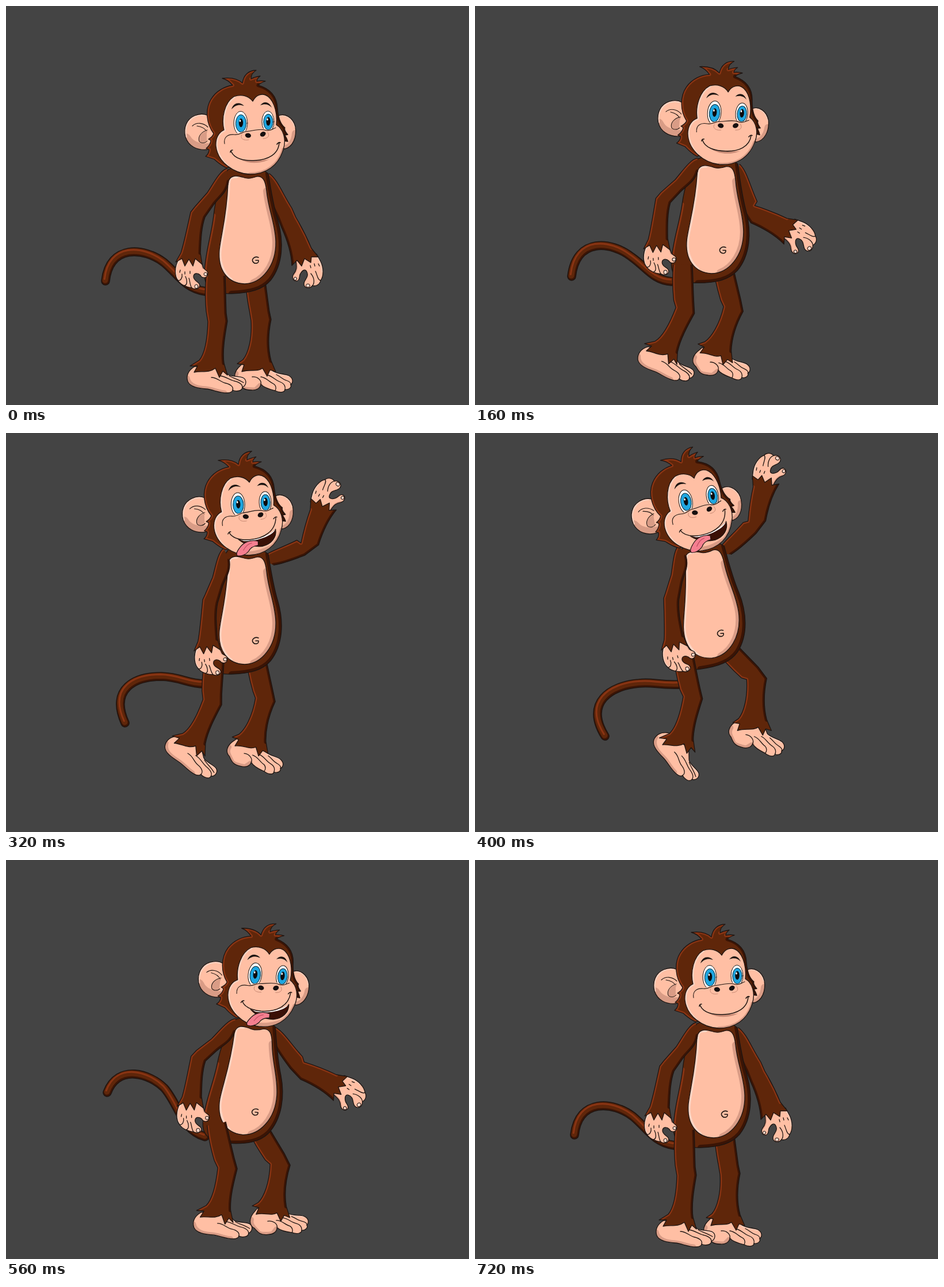
Write an HTML page that moves like this. It is 805x695 px and loops after 0.8 s.

```html
<!DOCTYPE html>
<html lang="en">
<head>
<meta charset="utf-8">
<title>Jumping monkey</title>
<style>
html, body { margin: 0; width: 100%; height: 100%; overflow: hidden; background: #444; }
svg { display: block; }
</style>
</head>
<body>
<svg id="stage" width="805" height="695" viewBox="0 0 805 695" fill="none" stroke-linejoin="round" stroke-linecap="round"></svg>
<script>
const LINE = '#1d1512';
const FUR = { fill: '#5f260a', light: '#8a3413', dark: '#3a1405' };
const SKIN = { fill: '#ffbfa4', light: '#ffd5c4', dark: '#d99c86' };
const stage = document.getElementById('stage');
let clips = 0;

function el(tag, attrs, parent) {
  const node = document.createElementNS('http://www.w3.org/2000/svg', tag);
  for (const k in attrs) node.setAttribute(k, attrs[k]);
  parent.appendChild(node);
  return node;
}
const group = parent => el('g', {}, parent);
const fill = (parent, d, color) => el('path', { d, fill: color }, parent);
const ink = (parent, d, width = 1.3, color = LINE) =>
  el('path', { d, stroke: color, 'stroke-width': width }, parent);
const oval = (parent, cx, cy, rx, ry, color, extra) =>
  el('ellipse', { cx, cy, rx, ry, fill: color, ...extra }, parent);

// Outlined shape with a light and a dark edge kept inside it
function solid(parent, tone, widthLight, widthDark) {
  const id = 'c' + clips++;
  const clip = el('path', {}, el('clipPath', { id }, parent));
  const body = fill(parent, '', tone.fill);
  const inner = el('g', { 'clip-path': `url(#${id})` }, parent);
  const dark = ink(inner, '', widthDark, tone.dark);
  const light = ink(inner, '', widthLight, tone.light);
  const edge = ink(parent, '');
  return (d, lightD, darkD) => {
    for (const p of [clip, body, edge]) p.setAttribute('d', d);
    light.setAttribute('d', lightD);
    dark.setAttribute('d', darkD);
  };
}

// Rotation about a rest point that is carried to a new place
function pin([rx, ry], [x, y], deg) {
  const t = deg * Math.PI / 180, a = Math.cos(t), b = Math.sin(t);
  return [a, b, -b, a, x - a * rx + b * ry, y - b * rx - a * ry];
}
const at = (m, [x, y]) => [m[0] * x + m[2] * y + m[4], m[1] * x + m[3] * y + m[5]];
const warp = (d, m) => d.replace(/(-?[\d.]+) (-?[\d.]+)/g, (_, x, y) =>
  at(m, [+x, +y]).map(v => v.toFixed(2)).join(' '));
const place = (node, m) => node.setAttribute('transform', `matrix(${m})`);

// Two bones wrapped in one outline; s = side strings, A = first side, B = second side
function limb(parent, rest, s, flip) {
  const draw = solid(parent, FUR, 6, 7);
  return (root, upDeg, lowDeg) => {
    const up = pin(rest[0], root, upDeg);
    const low = pin(rest[1], at(up, rest[1]), lowDeg);
    const a = warp(s.upA, up) + warp(s.lowA, low);
    const b = warp(s.lowB, low) + warp(s.upB, up);
    const sides = [a, b.replace('L', 'M')];
    if (flip) sides.reverse();
    draw(a + warp(s.cuff, low) + b, ...sides);
    return low;
  };
}

const tailG = group(stage);
const tail = [[15.6, LINE, 0], [13, FUR.dark, 0], [10, FUR.fill, -1.2], [3, FUR.light, -3.4]].map(([w, c, dy]) => {
  const p = ink(tailG, '', w, c);
  p.setAttribute('transform', `translate(${dy / 2} ${dy})`);
  return p;
});

const farFoot = group(stage);
solid(farFoot, SKIN, 4, 9)(
  'M404 630C396 639 395 650 404 656C410 665 414 669 426 669C435 670 442 666 443 659C450 666 460 668 468 670C478 675 485 672 485 668C492 669 497 664 495 660C500 655 499 648 492 644C484 640 474 642 464 636L455 622L412 622Z',
  'M464 636C474 642 484 640 492 644',
  'M400 640C396 650 404 656 410 665C414 669 424 669 434 669L442 661');
ink(farFoot, 'M443 659C445 652 437 645 428 646M443 646C453 647 457 655 465 658C470 661 470 667 468 670M455 643C464 645 468 652 477 655C485 658 486 664 485 668M470 642C478 646 480 650 487 652C493 654 496 657 495 660');

const FAR_HIP = [431, 456], NEAR_HIP = [363, 455], FAR_SHOULDER = [455, 305], NEAR_SHOULDER = [378, 300];
const FAR_ANKLE = [435, 630], NEAR_ANKLE = [352, 634];

const farLeg = limb(stage, [FAR_HIP, [443, 547]], {
  upA: 'M415 455C416 495 420 515 423 530',
  lowA: 'L426 548C428 580 421 605 412 616L402 623',
  cuff: 'L414 625L410 637C425 632 436 638 446 631L454 645L459 634L469 637',
  lowB: 'L461 618C455 595 456 570 461 546',
  upB: 'L458 532C455 510 451 480 448 455'
});

const farHand = group(stage);
solid(farHand, SKIN, 4, 4)(
  'M504 444C506 456 505 461 500 467C496 474 500 480 506 479C512 477 509 470 512 466C516 459 521 458 523 463C526 469 523 473 520 478C517 483 518 487 520 489C524 493 530 491 533 487C540 489 546 484 547 478C553 470 552 455 547 445L540 432L510 432Z',
  'M551 462C552 455 547 445 543 438', 'M504 444C506 456 505 461 500 467');
ink(farHand, 'M533 487C537 482 536 473 530 466M547 478C542 478 541 468 538 462M529 452l1 4M536 449l1 4M543 449l2 4');
oval(farHand, 525, 487, 3.4, 3, '#ffd8ca', { stroke: LINE });
oval(farHand, 503, 475, 2.6, 2.8, '#ffd8ca', { stroke: LINE });

const farArm = limb(stage, [FAR_SHOULDER, [490, 375]], {
  upA: 'M450 316C455 335 464 352 472 368',
  lowA: 'L479 386C490 410 496 430 497 452',
  cuff: 'L506 443L514 453L519 440L530 447L531 437L543 437',
  lowB: 'L531 422C524 405 514 385 504 368',
  upB: 'L497 352C480 325 472 302 458 292'
}, true);

const torso = group(stage);
solid(torso, FUR, 7, 10)(
  'M386 285C374 300 364 335 361 365C357 400 346 430 345 465C344 492 362 502 392 501C425 500 446 494 460 478C482 450 483 410 473 375C464 345 460 315 456 292C440 278 400 278 386 285Z',
  'M361 365C357 400 346 430 345 465',
  'M392 501C425 500 446 494 460 478C482 450 483 410 473 375C464 345 460 315 456 292');
solid(torso, SKIN, 8, 12)(
  'M386 309C388 294 400 295 411 298C420 302 428 300 436 297C447 296 451 304 453 322C456 355 468 378 469 410C470 452 445 483 415 484C385 483 368 460 371 425C374 398 384 365 386 309Z',
  'M400 296C388 296 387 300 386 309C384 365 374 398 371 425C368 450 380 470 390 477',
  'M453 322C456 355 468 378 469 410C470 445 452 473 430 482');
ink(torso, 'M439 438C432 435 427 441 429 445C432 450 440 449 439 443L434 443', 1.6);

const nearFoot = group(stage);
solid(nearFoot, SKIN, 4, 9)(
  'M328 628C316 635 313 645 316 654C320 664 336 666 348 667C360 668 370 674 384 674C391 674 394 671 394 669C400 672 411 671 411 664C418 661 419 652 413 648C406 644 396 647 386 642L372 626Z',
  'M386 642C396 647 406 644 413 648',
  'M315 648C318 664 336 666 348 667C360 668 368 673 380 674');
ink(nearFoot, 'M357 647C368 647 372 655 382 657C391 659 396 664 394 669M371 644C382 645 386 650 396 653C405 655 411 659 411 664M388 644C396 649 404 650 413 656');

const nearLeg = limb(stage, [NEAR_HIP, [367, 549]], {
  upA: 'M348 470C346 490 346 510 348 532',
  lowA: 'L351 550C350 580 346 605 336 617L320 627',
  cuff: 'L333 627L327 638C340 635 352 640 364 631L371 647L377 636L385 643',
  lowB: 'L379 622C376 600 381 572 385 549',
  upB: 'L383 535C382 510 382 490 381 470'
});

const nearHand = group(stage);
solid(nearHand, SKIN, 4, 4)(
  'M301 440C292 455 293 470 299 478C304 486 315 490 323 491C332 496 339 490 336 484C334 480 327 479 326 472C326 465 333 464 338 469C341 475 350 475 351 466C351 460 346 461 343 456C341 450 340 446 338 438Z',
  'M300 444C292 455 293 470 299 478', 'M343 456C341 450 340 446 338 438');
ink(nearHand, 'M299 478C304 479 307 473 306 467M310 487C316 486 315 477 312 471M323 491C319 485 320 478 318 474M303 460l-1 4M311 463l0 4M320 462l0 4');
oval(nearHand, 331, 488.5, 3, 3.4, '#ffd8ca', { stroke: LINE });
oval(nearHand, 347, 467, 3, 2.8, '#ffd8ca', { stroke: LINE });

const nearArm = limb(stage, [NEAR_SHOULDER, [334, 362]], {
  upA: 'M384 283C372 286 360 310 350 325L328 350',
  lowA: 'L321 359C314 390 309 415 304 430L295 446',
  cuff: 'L306 440L311 453L318 441L325 453L329 440L341 450',
  lowB: 'L338 430C339 405 340 385 346 368',
  upB: 'L362 345C372 332 384 325 387 306'
});

const head = group(stage);
solid(head, SKIN, 5, 20)(
  'M366 208C360 191 344 184 328 191C314 197 308 212 312 228C317 244 332 252 350 250L368 240Z',
  'M345 189C325 186 306 203 312 228', 'M312 232C320 246 334 250 352 249');
ink(head, 'M324 209C331 202 343 203 351 211M332 209C340 210 346 213 349 219', 1.1);
fill(head, 'M349 217C340 220 335 227 335 234C337 240 346 240 349 236Z', '#d99c86');
ink(head, 'M350 216C339 219 333 228 336 236C340 240 347 239 350 235', 1);
solid(head, SKIN, 4, 12)(
  'M472 192C484 185 499 194 503 210C506 228 499 246 484 249L474 240Z',
  'M478 190C490 188 500 198 503 210', 'M503 222C502 236 495 247 484 249');

const crown = 'C348 205 346 180 356 163C365 148 380 140 394 138C389 132 384 128 376 126C390 124 402 126 411 134C413 120 422 112 435 112';
const cheek = 'M384 282C374 278 368 272 362 267L347 262C352 258 353 254 353 250L348 248C354 243 356 238 356 234L352 232C357 229 360 226 361 222';
const right = 'C460 144 471 158 472 178C473 192 476 205 485 212C483 216 487 220 490 224L485 225C488 230 489 232 490 236L484 235C484 242 482 250 478 256';
solid(head, FUR, 6, 7)(
  cheek + crown + 'C428 116 426 121 426 127C431 124 436 123 442 122C437 126 436 128 436 131C441 130 446 130 451 131C445 133 441 135 439 138' + right + 'Z',
  cheek + crown + 'M426 127L442 122M436 131L451 131',
  'M439 138' + right);

solid(head, SKIN, 6, 6)(
  'M379 216C374 195 380 168 396 158C408 153 422 156 429 166C434 155 446 150 456 158C468 168 472 190 470 207C482 214 488 232 482 250C474 278 452 293 424 293C396 292 368 272 365 244C364 230 370 220 379 216Z',
  'M379 216C374 195 380 168 396 158M379 216C370 220 364 230 365 244C367 260 374 270 384 279',
  'M482 250C474 278 452 293 424 293');

function eye(x, y, rx, ry) {
  oval(head, x, y, rx, ry, '#fff', { stroke: LINE });
  oval(head, x + .5, y + .5, rx * .78, ry * .74, '#1fa6e0', { stroke: '#10242e' });
  oval(head, x + .5, y - .5, 3.7, 7.4, '#0b0b0d');
  oval(head, x - 1, y - 4, 1.3, 2, '#fff');
}
eye(408, 204, 11.8, 20.5);
eye(455.5, 201.5, 10.5, 18.5);
fill(head, 'M392 180C396 167 407 167 414 174C406 171 399 172 392 180Z', LINE);
fill(head, 'M442 173C449 164 458 167 462 177C457 171 450 170 442 173Z', LINE);
// muzzle top and nose
fill(head, 'M394 224C404 222 410 219 416 218C428 214 446 211 455 216L471 213L472 226L396 232Z', SKIN.fill);
ink(head, 'M380 240C378 228 386 223 397 224C405 225 409 221 415 219C428 218 440 213 450 216C458 219 464 214 469 212', 1.1);
ink(head, 'M410 224C406 231 414 235 422 233M455 220C460 227 454 231 447 231', .8, '#b87a66');
oval(head, 421, 225.5, 5.2, 4, '#171010', { transform: 'rotate(12 421 225)' });
oval(head, 446.5, 223.5, 5.2, 4, '#171010', { transform: 'rotate(-30 446 223)' });

const smile = group(head);
fill(smile, 'M408 268C425 276 445 274 458 267C446 269 425 271 408 268Z', '#c98b76');
ink(smile, 'M390 255C390 252 392 251 394 251M391 252C396 267 416 270 433 269C456 268 474 258 475 238M471 241C473 238 475 237 477 238', 1.5);

const laugh = group(head);
fill(laugh, 'M414 286C432 288 452 282 462 276C450 290 434 292 414 290Z', '#d99c86');
fill(laugh, 'M407 265C432 268 456 263 472 249C474 263 464 275 448 278C430 279 416 273 407 265Z', '#3a1006');
fill(laugh, 'M410 265.5C432 268 455 263 471 250C468 259 440 270 416 268Z', '#fff');
ink(laugh, 'M407 265C416 273 430 279 448 278C464 275 474 263 472 249');
el('path', { d: 'M441 269C428 265 416 270 409 279C404 285 401 290 404 293C410 295 419 292 424 286C427 280 432 277 441 276Z', fill: '#f57f90', stroke: LINE, 'stroke-width': 1.2 }, laugh);
ink(laugh, 'M430 272C422 273 418 279 415 284', 1, '#b8475c');
ink(laugh, 'M389 255C390 252 391 251 394 251M391 252C396 262 410 266 425 266C452 265 472 252 473 229M469 231C471 228 473 227 475 228', 1.4);

// head and torso: dx, dy, turn; legs: thigh, shin, foot; arms: upper, lower (degrees)
const rest = { head: [0, 0, 0], torso: [0, 0, 0], nearLeg: [0, 0, 0], farLeg: [0, 0, 0], nearArm: [0, 0], farArm: [0, 0],
  tail: [346, 497, 312, 492, 300, 468, 275, 447, 240, 420, 180, 415, 173, 479] };
const keys = [
  [0, rest],
  [2, { head: [1, -17, 4.7], torso: [-4, -18, 1.5], nearLeg: [-0.6, 19, 14], farLeg: [-5.8, 16.7, 5], nearArm: [7, -3], farArm: [8, -42],
    tail: [342, 480, 310, 478, 298, 455, 272, 437, 238, 410, 176, 402, 168, 471] }],
  [4, { head: [-2, -80, -1.8], torso: [0, -81, 0], nearLeg: [5.5, 18, 27], farLeg: [-4.7, 13, 11], nearArm: [-18, -7], farArm: [-84.5, -138],
    tail: [345, 437, 315, 437, 305, 425, 270, 424, 225, 424, 180, 445, 207, 505] }],
  [5, { head: [-28.5, -88, -9], torso: [-3, -92, -6], nearLeg: [-10, 8, 40], farLeg: [-36.6, 0, 13], nearArm: [-24, -14], farArm: [-107, -145],
    tail: [358, 438, 320, 440, 310, 433, 285, 436, 235, 440, 190, 470, 226, 528] }],
  [6, { head: [-7.5, -48, -0.8], torso: [-4, -49, -1], nearLeg: [-10.9, -5, -2], farLeg: [-31.7, -12, -14], nearArm: [-7, -7], farArm: [-62, -93.5],
    tail: [352, 458, 315, 455, 300, 430, 270, 418, 235, 405, 175, 405, 175, 474] }],
  [7, { head: [15.5, -3, 6.2], torso: [-4, -5.5, 5], nearLeg: [-11.6, 4.4, 0], farLeg: [-23.4, 5.5, -6], nearArm: [11, -1], farArm: [-10, -42],
    tail: [346, 482, 305, 470, 300, 425, 275, 397, 250, 372, 195, 355, 176, 405] }],
  [9, rest]
];
const STEP = 80, STEPS = 10;

function poseAt(step) {
  let i = 0;
  while (i < keys.length - 2 && keys[i + 1][0] <= step) i++;
  const [s0, a] = keys[i], [s1, b] = keys[i + 1];
  const k = (step - s0) / (s1 - s0), pose = {};
  for (const part in a) pose[part] = a[part].map((v, n) => v + (b[part][n] - v) * k);
  return pose;
}
const shift = ([x, y], [dx, dy]) => [x + dx, y + dy];

function draw(step) {
  const p = poseAt(step);
  const neck = [424, 290], hips = [415, 480];
  const core = pin(hips, shift(hips, p.torso), p.torso[2]);
  place(torso, core);
  place(head, pin(neck, shift(neck, p.head), p.head[2]));

  const leg = (move, hip, foot, ankle, [thigh, shin, turn]) =>
    place(foot, pin(ankle, at(move(at(core, hip), thigh, shin), ankle), turn));
  leg(farLeg, FAR_HIP, farFoot, FAR_ANKLE, p.farLeg);
  leg(nearLeg, NEAR_HIP, nearFoot, NEAR_ANKLE, p.nearLeg);
  place(farHand, farArm(at(core, FAR_SHOULDER), ...p.farArm));
  place(nearHand, nearArm(at(core, NEAR_SHOULDER), ...p.nearArm));

  const [x, y, ...curve] = p.tail;
  for (const t of tail) t.setAttribute('d', `M${x} ${y}C${curve.join(' ')}`);

  const open = step >= 3 && step <= 8;
  smile.setAttribute('display', open ? 'none' : 'inline');
  laugh.setAttribute('display', open ? 'inline' : 'none');
}

let shown = -1;
function tick() {
  const step = Math.floor(performance.now() / STEP) % STEPS;
  if (step !== shown) draw(shown = step);
  requestAnimationFrame(tick);
}
tick();
</script>
</body>
</html>
```
